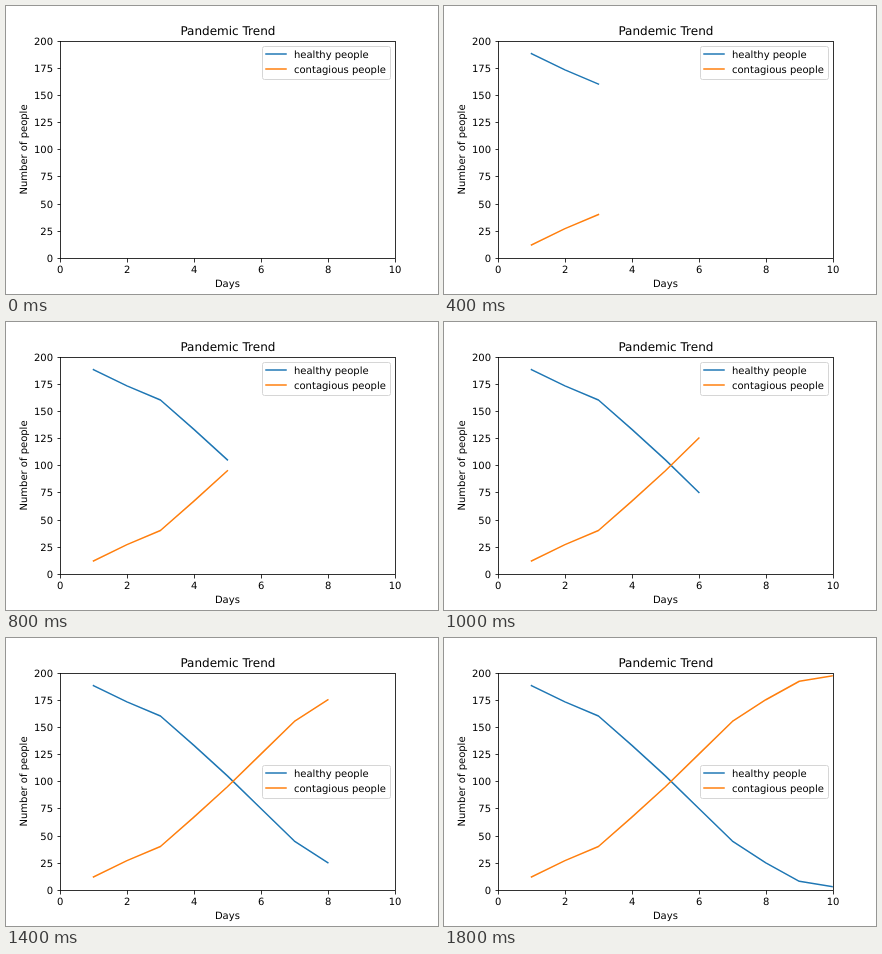
Animation of 432 by 288 pixels, one loop 2 s. Source, as an HTML page:

```html
<!DOCTYPE html>
<html lang="en">
<head>
<meta charset="utf-8">
<title>Pandemic Trend</title>
<style>
  html, body { margin: 0; width: 100%; height: 100%; overflow: hidden; background: #fff; }
  svg { display: block; width: 100%; height: 100%; }
  text { font: 10px "DejaVu Sans", sans-serif; text-rendering: geometricPrecision; }
  .mid { text-anchor: middle; }
  .end { text-anchor: end; }
  .title { font-size: 12px; }
  .axis { fill: none; stroke: #000; stroke-width: .8; }
  .line { fill: none; stroke-width: 1.5; stroke-linecap: square; stroke-linejoin: round; }
  .healthy { stroke: #1f77b4; }
  .contagious { stroke: #ff7f0e; }
</style>
</head>
<body>
<svg viewBox="0 0 432 288">
  <clipPath id="plot"><rect x="54" y="34.56" width="334.8" height="217.44"/></clipPath>
  <g clip-path="url(#plot)">
    <path id="healthy" class="line healthy"/>
    <path id="contagious" class="line contagious"/>
  </g>
  <g id="axes"><rect class="axis" x="54.5" y="35.5" width="335" height="217"/></g>
  <text class="mid title" x="221.9" y="29">Pandemic Trend</text>
  <text class="mid" x="221.4" y="281">Days</text>
  <text class="mid" transform="translate(21 143.5) rotate(-90)">Number of people</text>
  <g id="legend">
    <rect x="256.5" y="40.5" width="128" height="33" rx="2" fill="#fff" stroke="#ccc" opacity=".8"/>
    <path class="line healthy" d="M260 48h20"/>
    <path class="line contagious" d="M260 63h20"/>
    <text x="288" y="52">healthy people</text>
    <text x="288" y="67">contagious people</text>
  </g>
</svg>
<script>
const STEP = 200, TOTAL = 200;
const healthy = [188, 173, 160, 133, 105, 75, 45, 25, 8, 3];
const contagious = healthy.map(n => TOTAL - n);
const get = id => document.getElementById(id);
const px = day => 54 + day * 33.48;
const py = people => 252 - people * 1.0872;

let ticks = '';
for (let day = 0; day <= 10; day += 2) {
  const x = Math.round(px(day));
  ticks += `<path class="axis" d="M${x + .5} 252.5v4"/><text class="mid" x="${px(day) + .3}" y="267">${day}</text>`;
}
for (let n = 0; n <= TOTAL; n += 25) {
  const y = Math.round(py(n));
  ticks += `<path class="axis" d="M54.5 ${y + .5}h-3"/><text class="end" x="47" y="${y + 4}">${n}</text>`;
}
get('axes').insertAdjacentHTML('beforeend', ticks);

function plot(id, data, days) {
  const points = data.slice(0, days).map((n, i) => `${px(i + 1)} ${py(n)}`);
  get(id).setAttribute('d', days > 1 ? 'M' + points.join('L') : '');
}

function draw() {
  const days = Math.floor(performance.now() / STEP) % healthy.length + 1;
  plot('healthy', healthy, days);
  plot('contagious', contagious, days);
  // The legend moves out of the way once the upper curve reaches its corner.
  get('legend').setAttribute('transform', `translate(0 ${days < 8 ? 0 : 87})`);
  requestAnimationFrame(draw);
}
draw();
</script>
</body>
</html>
```
